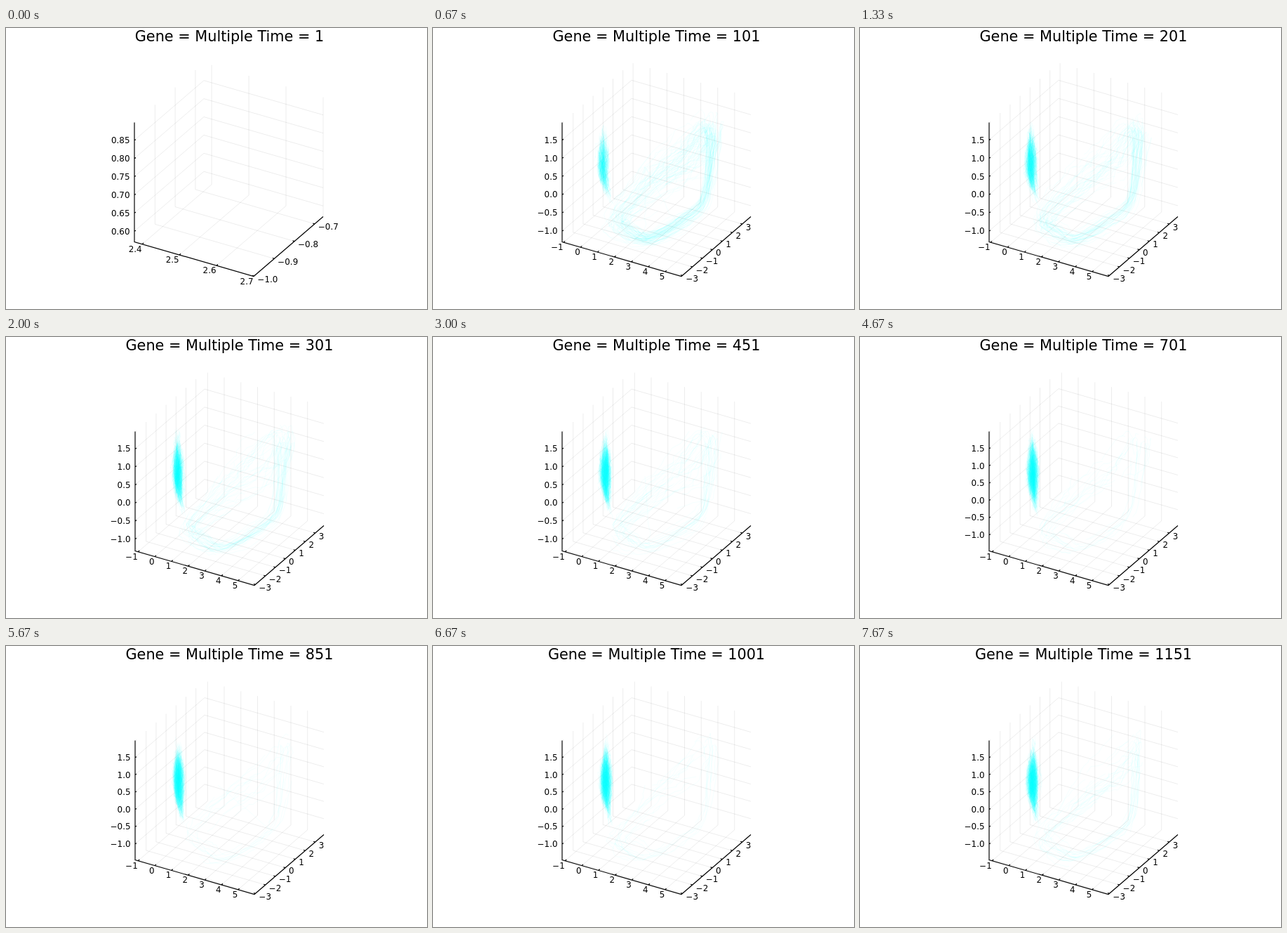
Recreate the animation shown at these times as an HTML page with a canvas. Size 600 px wide and 400 px high, loop 8000 ms.

```html
<!DOCTYPE html>
<html lang="en">
<head>
<meta charset="utf-8">
<title>Trajectories</title>
<style>
  html, body { margin: 0; width: 600px; height: 400px; overflow: hidden; background: #fff; }
  svg, canvas { position: absolute; left: 0; top: 0; }
  text { font: 11.9px "DejaVu Sans", sans-serif; fill: #000; }
  #title { font-size: 20.8px; text-anchor: middle; }
  .end { text-anchor: end; }
  #grid { stroke: #000; stroke-opacity: .075; fill: none; }
  #axes { stroke: #000; stroke-width: 1.15; fill: none; }
</style>
</head>
<body>
<svg width="600" height="400" viewBox="0 0 600 400">
  <path id="grid"/>
  <path id="axes"/>
  <g id="labels"></g>
  <text id="title" x="318.5" y="18.6"></text>
</svg>
<canvas id="cloud" width="600" height="400"></canvas>
<script>
const $ = id => document.getElementById(id);
const ctx = $('cloud').getContext('2d');
const LOOP = 8000, STEPS = 24;

// Box edges on screen: x axis, y axis, height
const X = [170, 49], Y = [99, -85], H = 170, FLOOR = 304.5;

// Data limits as they grow: from step, low, high
const LIMITS = {
  x: [[0, 2.379, 2.7], [1, -1.09, 5.96], [5, -1.18, 5.98]],
  y: [[0, -1.002, -.658], [1, -3.106, 3.866]],
  z: [[0, .5705, .8987], [1, -1.3, 1.98], [6, -1.33, 1.98], [14, -1.46, 1.99]]
};

// Key points of the cycle: x, y, spread
const CYCLE = [
  [262, 274, 7], [292, 242, 10], [335, 206, 13], [368, 182, 16], [393, 142, 8],
  [395, 180, 5], [385, 247, 4], [352, 278, 5], [308, 300, 4], [282, 291, 7]
];
const ORIGIN = [302, 198];

let seed = 1;
function rnd() {
  seed = (seed * 1664525 + 1013904223) >>> 0;
  return seed / 4294967296;
}
const gauss = () => (rnd() + rnd() + rnd() + rnd() - 2) * 1.73;

// Catmull-Rom position on the closed cycle
function onCycle(u) {
  const i = Math.floor(u), t = u - i, n = CYCLE.length;
  const [a, b, c, d] = [0, 1, 2, 3].map(j => CYCLE[(i + j - 1 + n) % n]);
  return b.map((p, m) => p + t / 2 * (c[m] - a[m]
    + t * (2 * a[m] - 5 * p + 4 * c[m] - d[m] + t * (3 * (p - c[m]) + d[m] - a[m]))));
}

function orbit() {
  const from = rnd() * CYCLE.length, len = 1 + rnd() * 2;
  let ox = gauss(), oy = gauss();
  ctx.beginPath();
  for (let u = 0; u <= len; u += .15) {
    const [x, y, s] = onCycle(from + u);
    ox += gauss() * .15;
    oy += gauss() * .15;
    ctx.lineTo(x + ox * s + gauss() * .6, y + oy * s + gauss() * .6);
  }
  ctx.stroke();
}

function departure() {
  const [x, y, s] = onCycle(rnd() * CYCLE.length);
  ctx.beginPath();
  for (let t = 0; t <= 1; t += .1) {
    ctx.lineTo(ORIGIN[0] + (x - ORIGIN[0]) * t + gauss() * s * t / 3,
               ORIGIN[1] + (y - ORIGIN[1]) * t + gauss() * s * t / 3);
  }
  ctx.stroke();
}

// Wobbling strand of the upright bundle, whose foot bends to the right
function upright(mid) {
  const off = gauss() * 3.4 + Math.max(0, gauss() - .8) * 3;
  const half = 10 + rnd() * 15, y0 = 194 + gauss() * 15;
  ctx.beginPath();
  for (let t = -1; t <= 1; t += .2) {
    const y = y0 + t * half + gauss() * 2;
    const taper = Math.max(.6, 1 - ((y - 192) / 65) ** 2);
    const foot = (249.5 - mid) * (Math.max(0, y - 196) / 42) ** 2;
    ctx.lineTo(mid + off * taper + foot + gauss(), y);
  }
  ctx.stroke();
}

function repeat(n, draw) {
  for (let i = 0; i < n; i++) draw();
}

function drawCloud(k) {
  ctx.clearRect(0, 0, 600, 400);
  if (!k) return;
  seed = 7919 * (k + 3);
  ctx.lineJoin = 'round';
  ctx.strokeStyle = 'rgba(0,255,255,.045)';
  const mid = 246 - 7 * Math.exp(-k / 4);
  repeat(20 + 480 * Math.exp(-k / 5) + 60 * (k / 23) ** 10, orbit);
  repeat(2400 * Math.exp(-3 * k), departure);
  repeat(1000 * (1 - Math.exp(-k / 3.5)), () => upright(mid));
}

// Ticks at the round step whose count is nearest to five
function ticks(axis, k) {
  const [, lo, hi] = LIMITS[axis].filter(l => l[0] <= k).pop();
  let best = [], digits = 0;
  for (const power of [-2, -1, 0]) {
    for (const base of [1, 2, 5]) {
      const step = base * 10 ** power, list = [];
      for (let i = Math.ceil(lo / step); i * step <= hi + 1e-9; i++) list.push(i * step);
      if (Math.abs(list.length - 5) < Math.abs(best.length - 5)) {
        best = list;
        digits = -power;
      }
    }
  }
  return best.map(v => ({
    p: (v - lo) / (hi - lo),
    s: v.toFixed(digits).replace(/^-(?=0$)/, '').replace('-', '\u2212')
  }));
}

function drawBox(k) {
  const left = k ? 184 : 183;
  const at = (u, v, w = 0) =>
    [left + u * X[0] + v * Y[0], FLOOR + u * X[1] + v * Y[1] - w * H];
  const line = (...pts) => 'M' + pts.map(p => p.map(c => c.toFixed(2)).join()).join('L');
  const text = (s, x, y, cls) => `<text class="${cls}" x="${x}" y="${y}">${s}</text>`;
  let grid = '', labels = '';
  let axes = line(at(0, 0, 1), at(0, 0), at(1, 0), at(1, 1));

  for (const { p, s } of ticks('x', k)) {
    const [x, y] = at(p, 0);
    grid += line([x, y], at(p, 1), at(p, 1, 1));
    axes += line([x, y], at(p, .02));
    labels += text(s, x - .5, y + 11, 'end');
  }
  for (const { p, s } of ticks('y', k)) {
    const [x, y] = at(1, p);
    grid += line([x, y], at(0, p), at(0, p, 1));
    axes += line([x, y], at(.985, p));
    labels += text(s, x + 5, y + 8.6, '');
  }
  for (const { p, s } of ticks('z', k)) {
    const [x, y] = at(0, 0, p);
    grid += line([x, y], at(0, 1, p), at(1, 1, p));
    axes += line([x, y], [x + 2, y - 1]);
    labels += text(s, x - 6.5, y + 4.3, 'end');
  }
  $('grid').setAttribute('d', grid);
  $('axes').setAttribute('d', axes);
  $('labels').innerHTML = labels;
}

let shown = -1;
function render(ms) {
  const k = Math.floor((ms % LOOP) * STEPS / LOOP + .011);
  if (k === shown || k >= STEPS) return;
  shown = k;
  $('title').textContent = 'Gene = Multiple Time = ' + (1 + 50 * k);
  drawBox(k);
  drawCloud(k);
}

const start = performance.now();
function tick() {
  render(performance.now() - start);
  requestAnimationFrame(tick);
}
tick();
</script>
</body>
</html>
```
